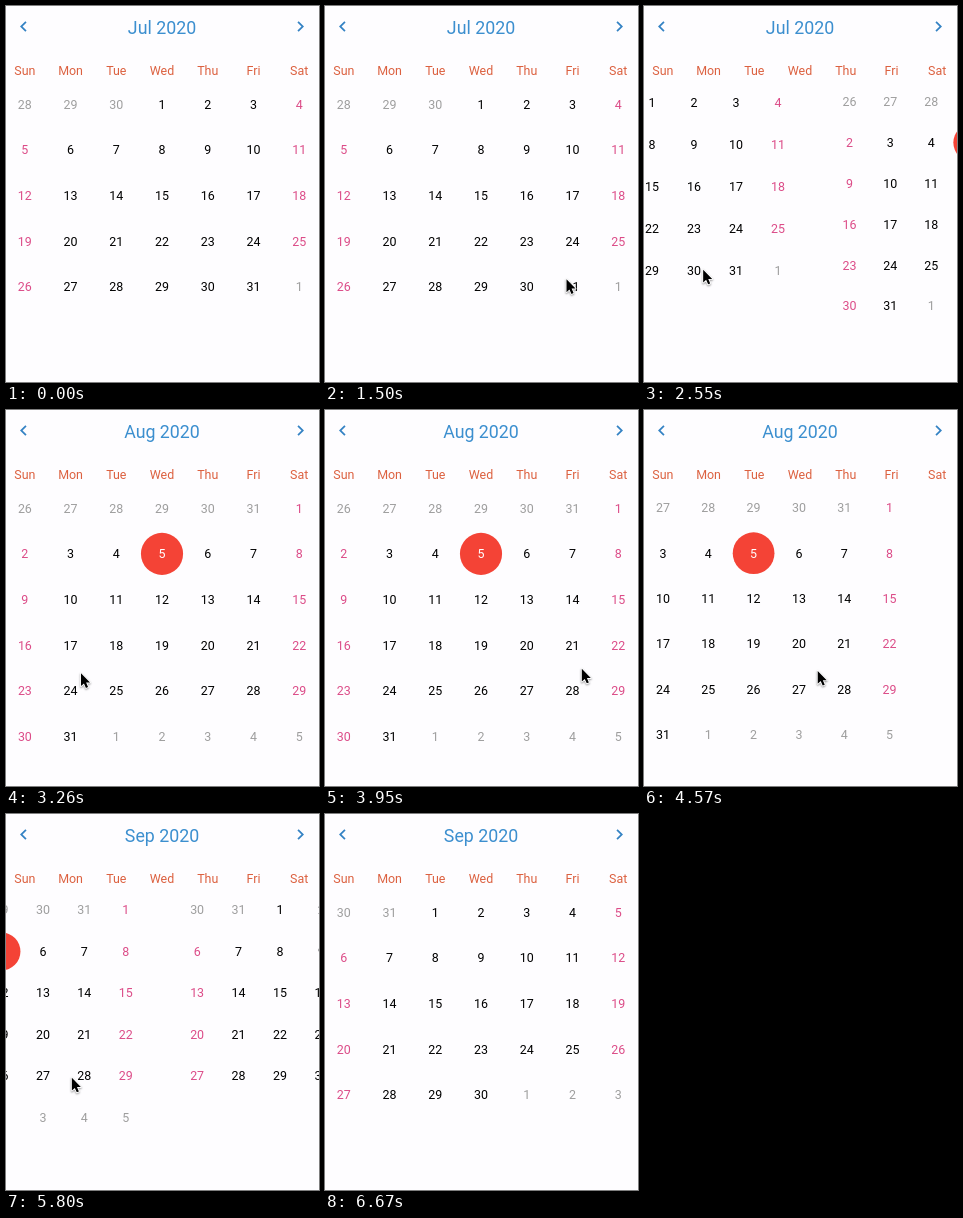
Recreate the animation shown at these times as an HTML page with a canvas. Size 313 by 376 pixels, loop 7.35 s.

```html
<!DOCTYPE html>
<html lang="en">
<head>
<meta charset="utf-8">
<title>Calendar swipe</title>
<style>
  html, body { margin: 0; width: 100%; height: 100%; overflow: hidden; background: #fefdff; }
  canvas { display: block; width: 313px; height: 376px; }
</style>
</head>
<body>
<canvas id="stage"></canvas>
<script>
const W = 313, H = 376, LOOP = 7350, STEP = 87.8;
const CENTER = 156, PAGE = 320, CELL = PAGE / 7, GRID_TOP = 75.3;
const SLOP = 29, LAG = 60, SPRING = 0.018;
const COLOR = {
  back: '#fefdff', title: '#3c8fcf', icon: '#3583c4', weekday: '#dc6140',
  day: '#000', weekend: '#dc4c88', other: '#9e9e9e', today: '#f44336'
};
const WEEKDAYS = ['Sun', 'Mon', 'Tue', 'Wed', 'Thu', 'Fri', 'Sat'];
const MONTHS = [
  { title: 'Jul 2020', lead: 3, days: 31, before: 30 },
  { title: 'Aug 2020', lead: 6, days: 31, before: 31, today: 5 },
  { title: 'Sep 2020', lead: 2, days: 30, before: 31 }
];

// Pointer moves; power sets how strongly a move slows down.
const OUTSIDE = { x: 150, y: 390 };
const MOVES = [
  { start: 630, end: 966, x: 190, y: 330, power: 1.5 },
  { start: 1250, end: 1650, x: 250, y: 262, power: 2 },
  { start: 1760, end: 2560, x: 55, y: 263, power: 1, drag: true },
  { start: 3200, end: 3951, x: 256, y: 258, power: 1.5 },
  { start: 3970, end: 5800, x: 65, y: 263, power: 1.45, drag: true },
  { start: 6350, end: 6670, ...OUTSIDE, power: 1 }
];

const canvas = document.getElementById('stage');
const ctx = canvas.getContext('2d');
const ratio = window.devicePixelRatio || 1;
canvas.width = Math.round(W * ratio);
canvas.height = Math.round(H * ratio);
ctx.scale(ratio, ratio);

const clamp01 = v => Math.min(1, Math.max(0, v));

function pointerAt(t) {
  let { x, y } = OUTSIDE;
  for (const m of MOVES) {
    const f = 1 - (1 - clamp01((t - m.start) / (m.end - m.start))) ** m.power;
    x += (m.x - x) * f;
    y += (m.y - y) * f;
  }
  return { x, y };
}

// A page follows the pointer, then springs to its place on release.
function swipeAt(t, { start, end }) {
  if (t < start) return 0;
  const travel = pointerAt(start).x - pointerAt(Math.min(t, end) - LAG).x;
  const dragged = Math.max(0, travel - SLOP);
  if (t < end) return dragged / PAGE;
  const s = (t - end) * SPRING;
  return 1 - (1 - dragged / PAGE) * (1 + s) * Math.exp(-s);
}

const pageAt = t => MOVES.filter(m => m.drag).reduce((sum, m) => sum + swipeAt(t, m), 0);

// cubic-bezier(0, 0, .58, 1)
function easeOut(x) {
  let lo = 0, hi = 1;
  for (let i = 0; i < 24; i++) {
    const m = (lo + hi) / 2;
    if (1.74 * m * m - 0.74 * m * m * m < x) lo = m; else hi = m;
  }
  return lo * lo * (3 - 2 * lo);
}

function text(str, x, midY, size, color) {
  ctx.font = `${size}px Roboto, sans-serif`;
  ctx.fillStyle = color;
  ctx.fillText(str, x, midY + size * 0.356);
}

function polygon(points) {
  ctx.beginPath();
  points.forEach(([x, y]) => ctx.lineTo(x, y));
  ctx.closePath();
}

function drawChevron(x, dir) {
  const u = 0.889;
  ctx.save();
  ctx.translate(x, 20.5);
  ctx.scale(u * dir, u);
  polygon([[3.7, -4.59], [2.29, -6], [-3.71, 0], [2.29, 6], [3.7, 4.59], [-0.88, 0]]);
  ctx.fillStyle = COLOR.icon;
  ctx.fill();
  ctx.restore();
}

function drawMonth(month, offset) {
  const cell = CELL * easeOut(clamp01(1 - Math.abs(offset) / 2));
  const mid = CENTER + offset * PAGE;
  const count = Math.ceil((month.lead + month.days) / 7) * 7;
  for (let i = 0; i < count; i++) {
    const col = i % 7;
    const x = mid + (col - 3) * cell;
    const y = GRID_TOP + (Math.floor(i / 7) + 0.5) * cell;
    let day = i - month.lead + 1;
    let color = col % 6 ? COLOR.day : COLOR.weekend;
    if (day < 1) {
      day += month.before;
      color = COLOR.other;
    } else if (day > month.days) {
      day -= month.days;
      color = COLOR.other;
    } else if (day === month.today) {
      ctx.beginPath();
      ctx.arc(x, y, (cell - 3.55) / 2, 0, Math.PI * 2);
      ctx.fillStyle = COLOR.today;
      ctx.fill();
      color = '#fff';
    }
    text(day, x, y, 12.44, color);
  }
}

function drawPointer({ x, y }) {
  ctx.save();
  ctx.translate(x + 0.8, y + 0.8);
  ctx.scale(0.8, 0.8);
  polygon([[0, 0], [0, 16], [3.7, 12.6], [6.2, 18.2], [8.8, 17.1], [6.4, 11.5], [11.3, 11.5]]);
  ctx.lineJoin = 'round';
  ctx.lineWidth = 2.2;
  ctx.strokeStyle = '#fff';
  ctx.shadowColor = 'rgba(0,0,0,.4)';
  ctx.shadowBlur = 2 * ratio;
  ctx.shadowOffsetY = ratio;
  ctx.stroke();
  ctx.shadowColor = 'transparent';
  ctx.fillStyle = '#000';
  ctx.fill();
  ctx.restore();
}

function render(now) {
  // motion advances in fixed steps
  const t = Math.floor((now % LOOP + 6) / STEP) * STEP;
  const page = pageAt(t);

  ctx.fillStyle = COLOR.back;
  ctx.fillRect(0, 0, W, H);
  ctx.textAlign = 'center';
  text(MONTHS[Math.round(page)].title, CENTER, 21.4, 17.78, COLOR.title);
  drawChevron(17.3, 1);
  drawChevron(294.7, -1);
  WEEKDAYS.forEach((name, i) => text(name, CENTER + (i - 3) * CELL, 64.5, 12.44, COLOR.weekday));
  MONTHS.forEach((month, i) => {
    if (Math.abs(i - page) < 1) drawMonth(month, i - page);
  });
  drawPointer(pointerAt(t));
}

const start = performance.now();
function tick() {
  render(performance.now() - start);
  requestAnimationFrame(tick);
}
tick();
</script>
</body>
</html>
```
